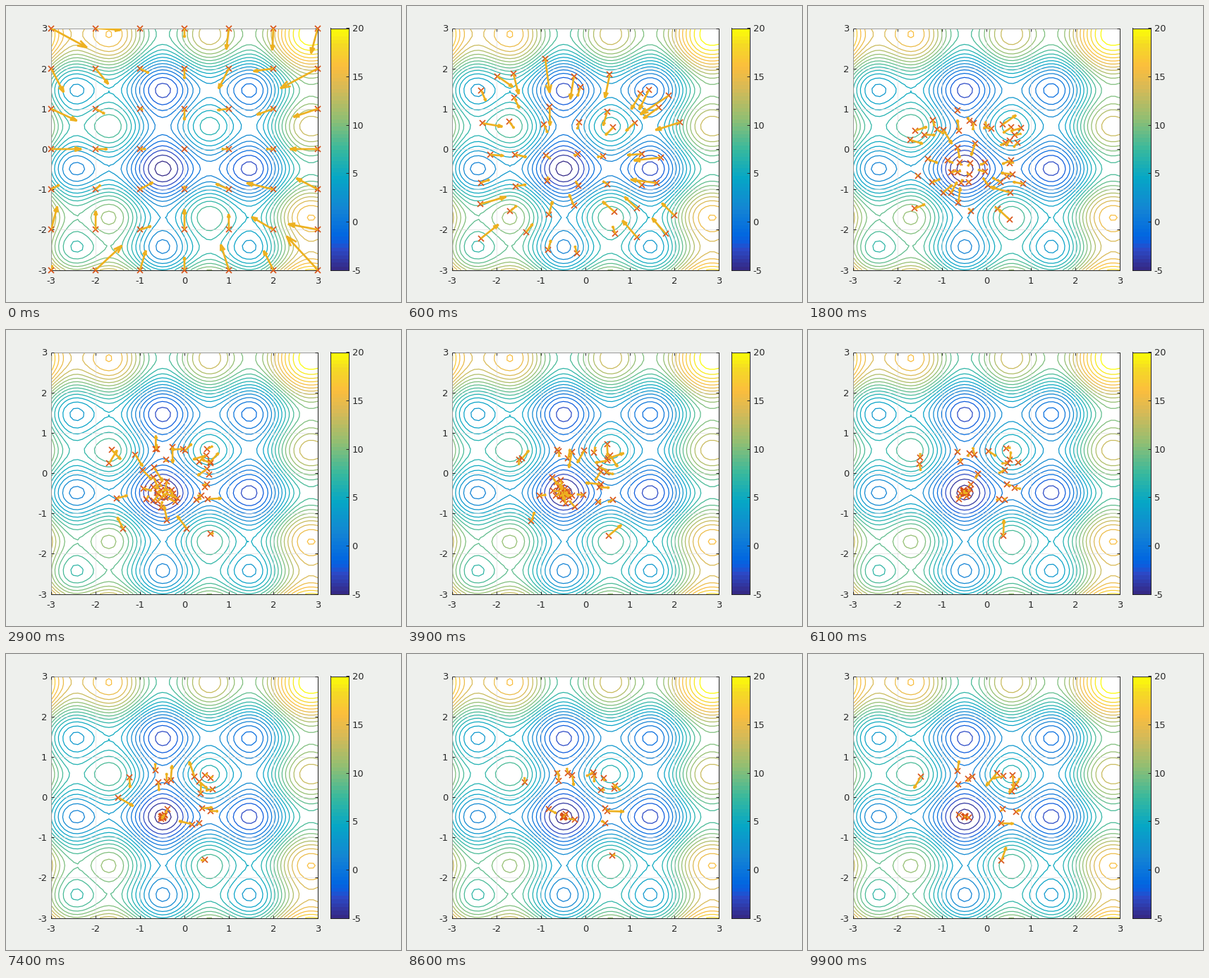
These frames come from a looping animation (560x420 px, 10000 ms). A matplotlib script:

```python
import numpy as np
import matplotlib.pyplot as plt
from matplotlib.animation import FuncAnimation
from matplotlib.colors import LinearSegmentedColormap

W, H, DPI = 560, 420, 80
PX = 72 / DPI                      # one pixel in points
FRAMES, INTERVAL = 100, 100
INERTIA, ATTRACT = 0.5, 0.07
INK = "#262626"

plt.rcParams.update({
    "font.family": "DejaVu Sans",
    "font.size": 13 * PX,
    "axes.unicode_minus": False,
    "axes.edgecolor": INK,
    "axes.linewidth": 1 * PX,
})

parula = LinearSegmentedColormap.from_list("parula", [
    (0.00, "#352a87"), (0.08, "#2c4ac7"), (0.11, "#0f5cdd"),
    (0.14, "#0268e1"), (0.25, "#1485d4"), (0.38, "#06a7c6"),
    (0.50, "#38b99e"), (0.63, "#92bf73"), (0.76, "#d9ba56"),
    (0.85, "#fcbe3d"), (0.94, "#f5db25"), (1.00, "#fcfc09"),
], N=64)


def wave(t):
    return t ** 2 + 3 * np.sin(3 * t)


def cost(x):
    return wave(x).sum(axis=-1)


def simulate(seed=7):
    """Particle swarm from a regular grid; positions and next moves."""
    rng = np.random.default_rng(seed)
    side = np.arange(-3.0, 4)
    x = np.stack(np.meshgrid(side, side), axis=-1).reshape(-1, 2)
    v = np.zeros_like(x)
    home = x.copy()
    path, moves = [], []
    for _ in range(FRAMES):
        goal = home[cost(home).argmin()]
        r_home, r_goal = rng.random((2,) + x.shape)
        v = INERTIA * v + ATTRACT * (r_home * (home - x) + r_goal * (goal - x))
        path.append(x)
        moves.append(v)
        x = x + v
        better = cost(x) < cost(home)
        home = np.where(better[:, None], x, home)
    return path, moves


def arrows(x, v):
    """Arrow lines scaled so that the longest one fits a mean cell."""
    cell = np.hypot(*np.ptp(x, axis=0)) / np.sqrt(len(x))
    u = v * 0.9 * cell / np.hypot(*v.T).max()
    tip, back = x + u, x + 0.77 * u
    side = np.column_stack([-u[:, 1], u[:, 0]]) * 0.075
    gap = np.full_like(x, np.nan)
    parts = [x, tip, gap, back + side, tip, back - side, gap]
    return np.stack(parts, axis=1).reshape(-1, 2).T


def add_axes(left, top, right, bottom):
    return fig.add_axes([left / W, 1 - bottom / H,
                         (right - left) / W, (bottom - top) / H])


def style_ticks(axes, **kwargs):
    axes.tick_params(direction="in", length=4 * PX, width=1 * PX, color=INK,
                     labelcolor=INK, **kwargs)


path, moves = simulate()

fig = plt.figure(figsize=(W / DPI, H / DPI), dpi=DPI, facecolor="#eef0ed")

ax = add_axes(64, 31.5, 442, 374.5)
t = np.linspace(-3, 3, 61)
ax.contour(t, t, wave(t)[None, :] + wave(t)[:, None], levels=np.arange(-5, 21),
           cmap=parula, vmin=-5, vmax=20, linewidths=1.25 * PX)
ax.set(xlim=(-3, 3), ylim=(-3, 3), xticks=range(-3, 4), yticks=range(-3, 4))
ax.set_axisbelow(False)
ax.grid(color="#dcdcdc", lw=0.8 * PX, alpha=0.8)
style_ticks(ax, top=True, right=True)
ax.tick_params(axis="x", pad=9 * PX)
ax.tick_params(axis="y", pad=6 * PX)

bar = add_axes(460, 31.5, 486, 374.5)
bar.imshow(np.arange(64)[:, None], cmap=parula, origin="lower", aspect="auto",
           extent=(0, 1, -5, 20), interpolation="nearest")
bar.set(xticks=[], yticks=range(-5, 21, 5))
bar.yaxis.tick_right()
style_ticks(bar, pad=4.5 * PX)

crosses, = ax.plot([], [], "x", color="#d95319", ms=7.5 * PX, mew=1.7 * PX,
                   clip_on=False, zorder=4)
shafts, = ax.plot([], [], color="#edb120", lw=2.7 * PX, zorder=5,
                  solid_capstyle="butt", solid_joinstyle="miter")


def draw(i):
    crosses.set_data(*path[i].T)
    shafts.set_data(*arrows(path[i], moves[i]))
    return crosses, shafts


anim = FuncAnimation(fig, draw, frames=FRAMES, interval=INTERVAL, repeat=True,
                     repeat_delay=0)
plt.show()
```
